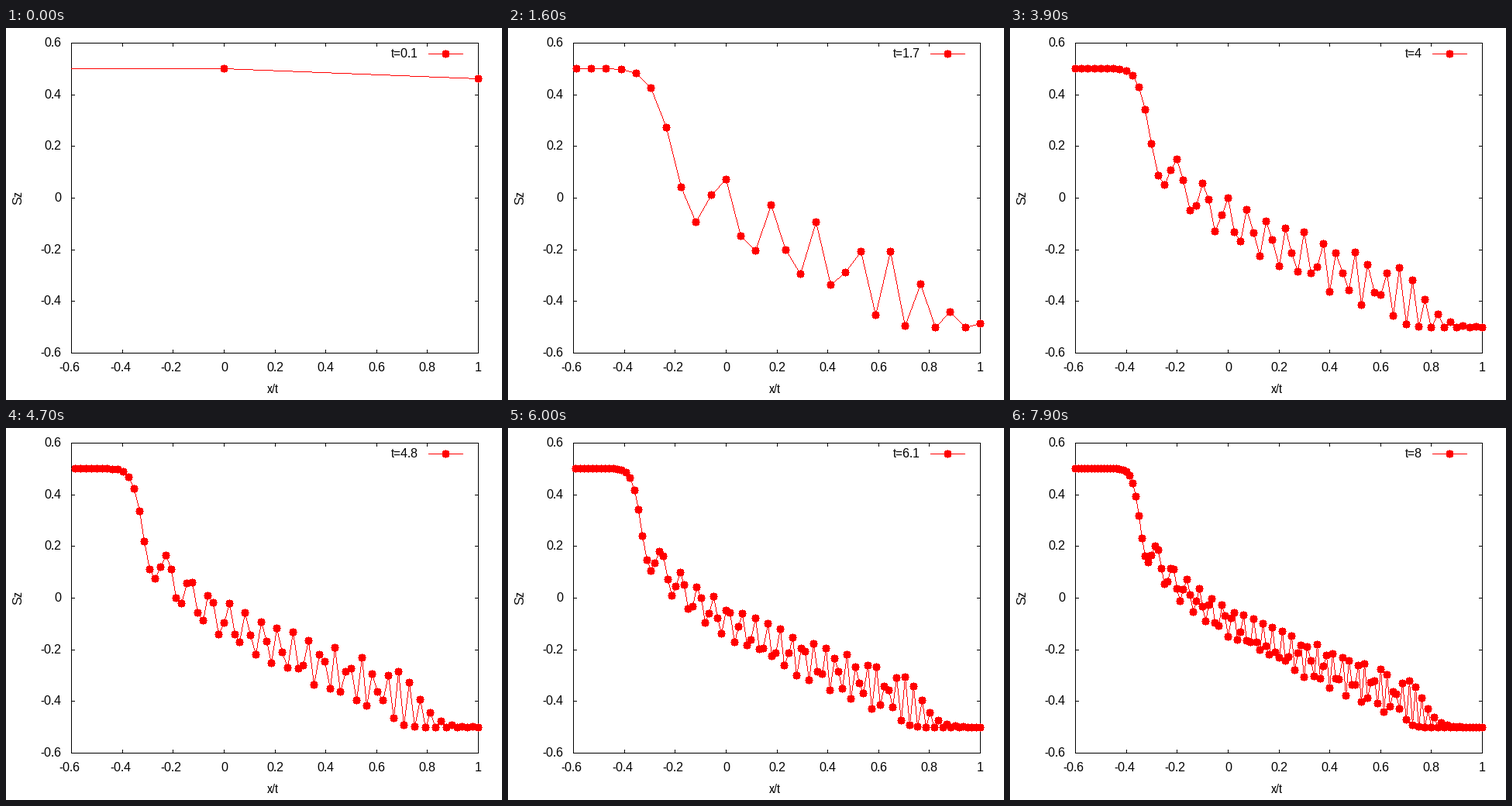
A matplotlib script that plays this animation: 640x480 px, repeating every 8000 ms.

```python
import numpy as np
import matplotlib.pyplot as plt
from matplotlib.animation import FuncAnimation
from matplotlib.patches import PathPatch
from matplotlib.path import Path

STEPS = 80
LEFT, RIGHT, TOP, BOTTOM = 84, 609, 19, 419
TICK = 4
RADIUS = 5
RED = "#ff0000"
PT = 0.72  # points per pixel at 100 dpi

plt.rcParams["font.family"] = "Liberation Sans"
plt.rcParams["font.size"] = 16 * PT
plt.rcParams["text.hinting"] = "native"
plt.rcParams["text.hinting_factor"] = 1


def px(x):
    return np.floor(LEFT + (x + 0.6) * (RIGHT - LEFT) / 1.6 + 0.5)


def py(y):
    return np.floor(BOTTOM - (y + 0.6) * (BOTTOM - TOP) / 1.2 + 0.5)


def bessel(orders, z):
    a = 2 * np.pi * np.arange(512) / 512
    return np.cos(np.outer(orders, a) - z * np.sin(a)).mean(axis=1)


def magnetization(k):
    """Domain wall melting under 100 <-> 001 hops, at sites around x = 0.

    With "00" counted as one hole the particles are free fermions; the p-th
    one from the right, at reduced site j, sits on real site 1 + 2j + p.
    """
    z = 0.4 * k
    r = int(np.ceil(z)) + 12
    size = 2 * r + 1
    orders = np.arange(-r, 3 * r + 1)
    shift = np.arange(size)
    amp = bessel(orders, z)[shift[:, None] + shift[None, :]]
    corr = amp @ amp.T

    # tail[a, p]: chance of more than p particles on reduced sites >= a - r
    count = size + 1
    root = np.exp(2j * np.pi * np.arange(count) / count)
    tail = np.zeros((size + 1, count))
    for a in range(size):
        lam = np.linalg.eigvalsh(corr[a:, a:])
        phi = np.prod(1 + lam[:, None] * (root - 1), axis=0)
        tail[a] = 1 - np.cumsum(np.fft.fft(phi).real / count)
    prob = tail[:-1] - tail[1:]

    j = shift[:, None] - r
    site = 1 + 2 * j + np.arange(count)[None, :]
    dens = np.bincount((site + 2 * r).ravel(), weights=prob.ravel())
    dens[:r + 4] = 1  # untouched region on the left

    n = np.arange(int(np.floor(-0.6 * k)) - 1, k + 2)
    return n, dens[n + 2 * r] - 0.5


def boxes(x, y, w=1, h=1):
    """One path made of pixel-aligned rectangles."""
    x, y, w, h = (v.ravel() for v in np.broadcast_arrays(x, y, w, h))
    corners = [(x, y), (x + w, y), (x + w, y + h), (x, y + h), (x, y)]
    verts = np.array(corners, float).transpose(2, 0, 1).reshape(-1, 2)
    codes = [Path.MOVETO] + [Path.LINETO] * 3 + [Path.CLOSEPOLY]
    return Path(verts, np.tile(codes, len(x)))


def discs(x, y):
    dy = np.arange(-RADIUS, RADIUS + 1)
    half = np.floor(np.sqrt(RADIUS ** 2 - dy ** 2))
    x, y = np.atleast_1d(x)[:, None], np.atleast_1d(y)[:, None]
    return boxes(x - half, y + dy, 2 * half + 1)


def polyline(x, y):
    """One-pixel line through the points, cut at the frame."""
    xs, ys = [], []
    for x0, y0, x1, y1 in zip(x, y, x[1:], y[1:]):
        steps = int(max(abs(x1 - x0), abs(y1 - y0), 1))
        xs.append(np.rint(np.linspace(x0, x1, steps + 1)))
        ys.append(np.rint(np.linspace(y0, y1, steps + 1)))
    xs, ys = np.concatenate(xs), np.concatenate(ys)
    inside = (xs >= LEFT) & (xs <= RIGHT)
    return boxes(xs[inside], ys[inside])


fig = plt.figure(figsize=(6.4, 4.8), dpi=100, facecolor="white")
ax = fig.add_axes([0, 0, 1, 1])
ax.set_xlim(0, 640)
ax.set_ylim(480, 0)
ax.axis("off")


def fill(path, color="black", z=1):
    return ax.add_patch(PathPatch(path, fc=color, lw=0, zorder=z, snap=False))


def label(x, y, s, ha="center", va="baseline", **kw):
    return ax.text(x, y, s, ha=ha, va=va, color="black", **kw)


fill(boxes(LEFT, [TOP, BOTTOM], RIGHT - LEFT + 1))
fill(boxes([LEFT, RIGHT], TOP, 1, BOTTOM - TOP + 1))

for i in range(-3, 6):
    v = i / 5
    x = px(v)
    fill(boxes(x, [TOP, BOTTOM - TICK], 1, TICK + 1))
    label(x + (-2 if i < 0 else 0.5), 443, "%g" % v)
    if i <= 3:
        y = py(v)
        fill(boxes([LEFT, RIGHT - TICK], y, TICK + 1))
        label(71, y + 5, "%g" % v, ha="right")

label(344.5, 471, "x/t")
label(15.5, 219.5, "Sz", va="center", rotation=90)

key = label(532, 38, "", ha="right")
fill(boxes(545, 33, 45), RED)
fill(discs(567, 33), RED)

curve = fill(boxes(0, 0), RED, 3)
points = fill(boxes(0, 0), RED, 4)

profiles = [magnetization(k) for k in range(1, STEPS + 1)]


def update(i):
    k = i + 1
    n, sz = profiles[i]
    x, y = px(n / k), py(sz)
    seen = (n <= k) & (5 * n >= -3 * k)
    curve.set_path(polyline(x, y))
    points.set_path(discs(x[seen], y[seen]))
    key.set_text("t=%g" % (k / 10))
    return curve, points, key


anim = FuncAnimation(fig, update, frames=STEPS, interval=100, repeat=True,
                     repeat_delay=0, blit=False)
plt.show()
```
